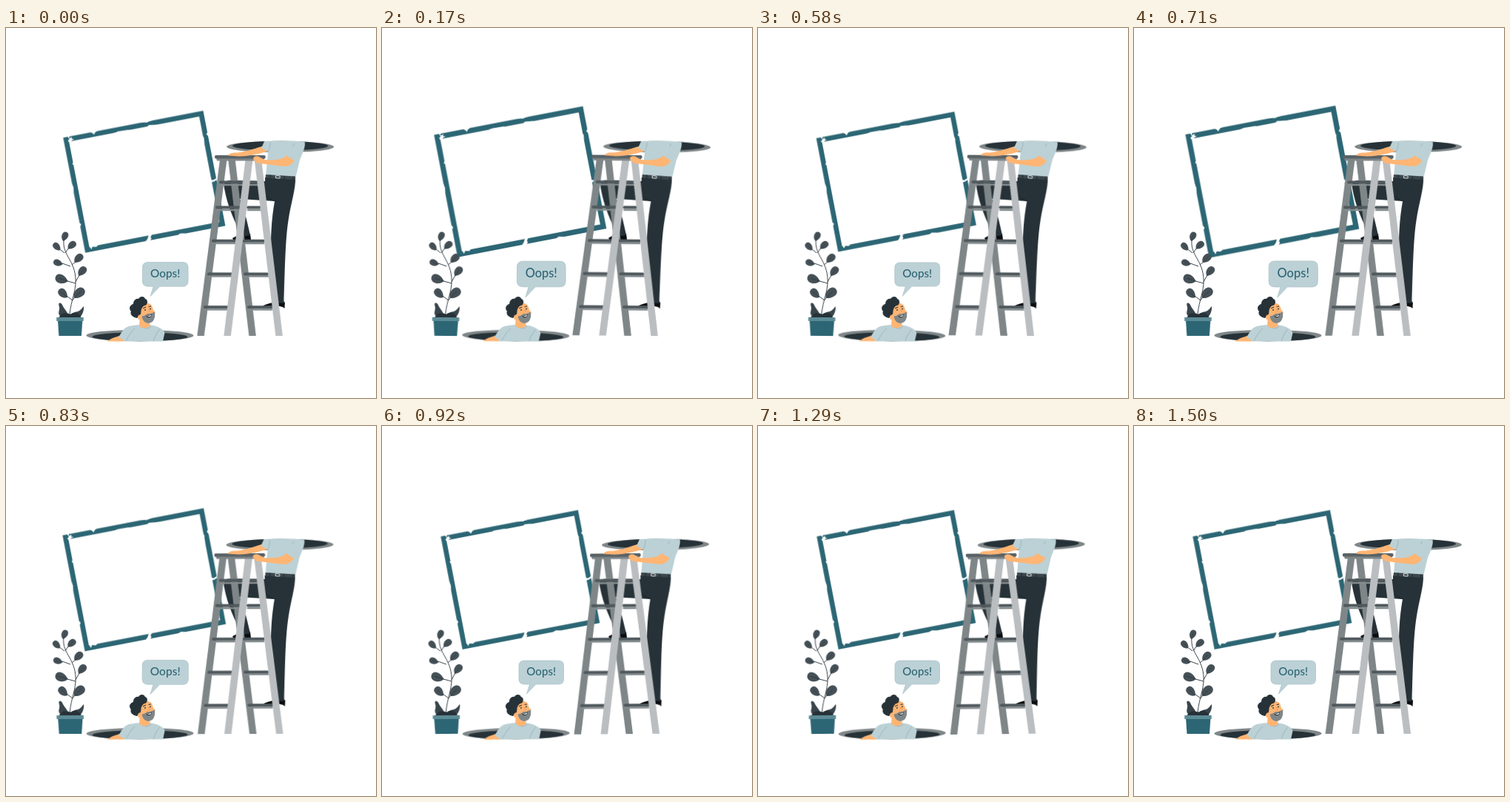
An HTML page for the animation above (1540 ms loop, 500x500 px).

```html
<!DOCTYPE html>
<html lang="en">
<head>
<meta charset="utf-8">
<title>Oops</title>
<style>
  html, body { margin: 0; width: 100%; height: 100%; overflow: hidden; background: #fff; }
  svg { display: block; width: 100vw; height: 100vh; }
  .beat, .sway { animation: beat 1540ms linear -28ms infinite; }
  .sway { animation-name: sway; }
  @keyframes beat {
    0%, 29.2%, 39%, 58.4%, 100% { transform: scale(1); }
    9.75%, 48.7% { transform: scale(1.1); }
  }
  @keyframes sway {
    0%, 100% { transform: rotate(0deg); }
    25% { transform: rotate(1deg); }
    75% { transform: rotate(-1deg); }
  }
  #frame { transform-origin: 187px 207.5px; }
  #bubble { transform-origin: 215px 339px; }
  #climber { transform-origin: 350.5px 284.5px; }
  #plant { transform-origin: 86px 345.5px; }
  #faller { transform-origin: 181px 393px; }
  .teal { fill: #2c6674; }
  .ink { fill: #263238; }
  .black { fill: #0b0e10; }
  .skin { fill: #ffb573; }
  .cloth { fill: #bcd1d6; }
  .grey { fill: #7f8688; }
  .light { fill: #babec1; }
  .white { fill: #fff; }
  .leaf { fill: #455057; }
  .crease { fill: none; stroke: #8fa8ae; stroke-width: .7; }
  .stem { fill: none; stroke: #39444b; stroke-width: 1; }
  text { font: 500 15.1px Lato, Inter, sans-serif; text-anchor: middle; }
</style>
</head>
<body>
<svg viewBox="0 0 500 500">
  <defs>
    <g id="leaf">
      <path class="leaf" d="M0 0C-4-1.500-6-6-5-10C-4.300-13-1-14.200 1.500-13C5.300-11 4.300-4 0 0Z"/>
      <path d="M0 0L-.8-10" fill="none" stroke="#2f3a40" stroke-width=".6"/>
    </g>
  </defs>

  <g id="frame" class="beat">
    <g transform="translate(187 207.5) rotate(-10.9)">
      <rect x="-91.400" y="-74.200" width="182.400" height="148.800" fill="#fff" stroke="#2c6674" stroke-width="6.600"/>
      <g class="white">
        <path d="M-89-79L-87-74L-89.500-72L-87-69L-84-72L-81-72.500L-84-74L-83-76L-87-75L-86-79Z"/>
        <path d="M-59-79L-55-75.500L-54-73.500L-52-76L-47-79Z"/>
        <path d="M-30-70L-22-71.800L-8-71.500L-4-70Z M16-70L20-72.300L27-71.500L36-70Z"/>
        <path d="M5-79L18-76.400L30-79Z M95.500-50L92.500-46L95.500-42Z M87-46L88.500-42L87-30Z"/>
        <path d="M86 14L90 15.500L96 13L96 15L91 17.500L86 18Z"/>
        <path d="M-14 79L-10 75L-8 71L-3 70L-6 74L-5 76L-8 79Z"/>
        <path d="M-75 70L-79 73L-84 71.800L-86 75L-88 70Z M28 79L34 76.500L46 79Z"/>
        <path d="M-87-44L-89.500-41L-87-38Z M-96-20L-93.700-10L-96 2Z M-96 36L-93 40L-96 44Z"/>
      </g>
    </g>
  </g>

  <g id="plant" class="sway">
    <g class="stem">
      <path d="M86 391C86 375 93 360 94 346C95 332 91 322 86 313C81 304 77 298 78 286"/>
      <path d="M79 304L74 300M80 304L84 298M87 322L76 318M89 320L94 316M94 345L83 342M94 343L99 334M90 368L82 362M89 369L93 364"/>
    </g>
    <use href="#leaf" transform="translate(77.500 288) rotate(22) scale(.95)"/>
    <use href="#leaf" transform="translate(73.500 300) rotate(-42) scale(.95)"/>
    <use href="#leaf" transform="translate(84 298.500) rotate(50)"/>
    <use href="#leaf" transform="translate(76.500 319) rotate(-70) scale(.95)"/>
    <use href="#leaf" transform="translate(93 317) rotate(46) scale(1.1)"/>
    <use href="#leaf" transform="translate(83.500 342) rotate(-68) scale(1.3)"/>
    <use href="#leaf" transform="translate(98.500 335) rotate(40) scale(1.1)"/>
    <use href="#leaf" transform="translate(83 364) rotate(-43) scale(1.15)"/>
    <use href="#leaf" transform="translate(92 365) rotate(50) scale(1.35)"/>
    <path fill="#39444b" d="M85 392C84 383 79 381 76 374C73 370 70 371 72 377C73 381 70 384 72 388L76 392Z
      M85 392C88 385 92 384 97 383C101 382 103 378 105 376C106 382 102 391 98 392Z"/>
    <path class="ink" d="M71 392C75 384 82 384 87 387C92 383 99 384 102 392Z"/>
    <path class="teal" d="M70 394H103.500L102 416H71.500Z"/>
    <rect x="68.300" y="391" width="36.500" height="5" fill="#5c8b95"/>
  </g>

  <g id="faller" class="sway">
    <ellipse class="grey" cx="181" cy="415.500" rx="72.500" ry="7.700"/>
    <ellipse class="ink" cx="181" cy="417.300" rx="64.500" ry="6"/>
    <path class="skin" d="M137 423.500C142 419 150 417 157 415L165 418L160 423.500Z"/>
    <path class="cloth" d="M152 418C156 412 159 405 166 403C174 401 190 400 199 402C207 404 213 407 214.500 412L212 423.500H161Z"/>
    <path class="crease" d="M174 406C168 412 165 417 162 423M208 407C203 412 201 418 199 423M196 403C193 407 186 407 181 402"/>
    <path class="skin" d="M181 390L180 402C184 407 192 406 195 402L193 395Z"/>
    <path class="skin" d="M178 384C177 376 184 371 191 372C197 372 198 377 199 381L202 384L200 388C200 395 195 399 190 398C184 397 180 392 178 384Z"/>
    <path class="grey" d="M183.500 389C187 390 189 387 192 386C196 387 198 384 201 384C202 391 200 398 193 399C188 399 184 395 183.500 389Z"/>
    <path class="black" d="M189.500 389C192 389.500 195 388 197 386.500C197 391 192 393 189.500 389Z"/>
    <path class="white" d="M190.500 389.300C193 389.200 195 388.300 196.500 387.200L196 389C194 390.500 192 390.500 190.500 389.300Z"/>
    <g class="ink">
      <circle cx="188" cy="381" r=".9"/><circle cx="195" cy="379.500" r=".9"/>
      <path d="M185 378.500L189 376.500L189.300 377.500L185.300 379.500ZM192.500 376L196 375.500L196 376.500L192.700 377Z"/>
    </g>
    <path d="M192 380L194.500 383L192.500 384" fill="none" stroke="#e58f4c" stroke-width=".7"/>
    <path class="ink" d="M177 392C171 391 167 387 169 383C165 379 168 374 172 373C172 368 176 365 179 366
      C181 362 187 362 188 366C192 367 192 373 188 375C186 375 184 377 183 380C182 383 183 386 181 388Z"/>
    <ellipse class="skin" cx="181" cy="391" rx="2.800" ry="3.600"/>
  </g>

  <g id="bubble" class="beat">
    <path d="M192.500 317H238.500Q245.500 317 245.500 324V342Q245.500 349 238.500 349H208L195.500 362L199.500 349H192.500Q185 349 185 342V324Q185 317 192.500 317Z" fill="#bcd1d6" stroke="#a9c1c7" stroke-width=".7"/>
    <text class="teal" x="215.200" y="337.200">Oops!</text>
  </g>

  <g id="climber" class="sway">
    <ellipse class="grey" cx="370.500" cy="160.500" rx="72.500" ry="7.700"/>
    <ellipse class="ink" cx="370.500" cy="159.200" rx="64.500" ry="6.400"/>

    <path class="black" d="M348 375C355 372 361 371 365 369H375L377 371L376.500 379L374 377L368 375.500L362 376H348Z
      M306 284C311 281 317 279 321 276L330 278L331 286H307Z"/>
    <path class="ink" d="M350 202H391C391.500 218 385 236 381.500 260C377.500 286 377 322 375.500 372L364.500 371C359 330 354 285 363 234
      L316 231C322 245 326 262 330 280L320 282C309 263 299 240 295 217C293 207 298 206 306 206L350 207Z"/>
    <path d="M352 228L363 234" fill="none" stroke="#121a1e" stroke-width=".7"/>

    <g class="grey">
      <path d="M300 177H309.500L338 416H328.500Z"/>
      <path d="M289 177H298.500L268 416H258.500Z"/>
    </g>
    <g fill="none" stroke-linecap="round">
      <path stroke="#858c8e" stroke-width="2.500" d="M290 212H343M285 246H318M280 291H312M275 335.500H306M269 380.500H300M327 246H343M322 291H348M323 335.500H354M328 380.500H359"/>
      <path stroke="#50595d" stroke-width="4" d="M290 208.500H343M285 242.500H318M280 287.700H312M274 332.400H306M269 377.300H300M327 242.500H343M322 287.700H348M323 332.400H353M328 377.300H359"/>
    </g>
    <path class="light" d="M323.500 177H333.500L304 416H294.500ZM335.500 177H345L374 416H364.500Z"/>
    <path class="grey" d="M283.500 175H349.500L348 179.500H285Z"/>
    <rect x="282" y="172" width="68.500" height="4.500" rx="1.500" fill="#596266"/>

    <path class="skin" d="M354 159L355 166C343 170 330 173 315 173.500L300 172.500C301 169.500 306 168 313 168.500C326 167 338 162 349 159Z"/>
    <path class="cloth" d="M349 153C365 151.800 385 152 403.500 153.500C405 160 401 168 397 178L391.500 201L351 199L354 167L345 162Z"/>
    <path class="crease" d="M357 154C357 161 355 165 353.500 168M390 156C385 162 384 169 383 174"/>
    <path class="skin" d="M380 171L390 177C388 184 382 187 375 187L347 183.500C342 184 337 182 334.500 178C333 174 337 172.500 341 173.500L349 178C359 179 370 178 376 175Z"/>
    <path class="cloth" d="M384 160L403 160L394 181C389 179 383 175 379 172Z"/>

    <path fill="#3b474d" d="M351 198L391 200.500V205L350.500 202.500Z"/>
    <path d="M364.500 199.700L370 200V203L364.500 202.700Z" fill="#263238" stroke="#e4e8ea" stroke-width="1"/>
    <path d="M357 198.500V203M376 200V204M388 200.500V205" stroke="#1c262b" stroke-width="1"/>
  </g>
</svg>
</body>
</html>
```
